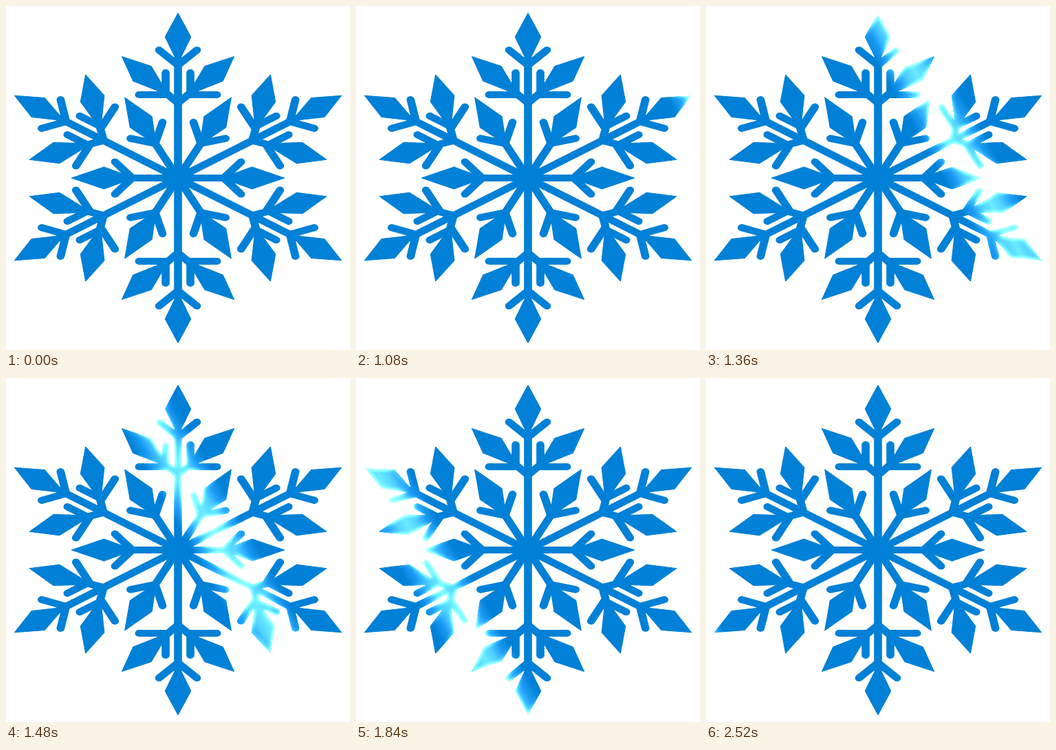
An HTML page that plays this animation: 500 by 500 pixels, repeating every 4120 ms.

```html
<!DOCTYPE html>
<html lang="en">
<head>
<meta charset="utf-8">
<title>Snowflake</title>
<style>
  html, body { margin: 0; width: 100%; height: 100%; overflow: hidden; background: #fff; }
  svg { display: block; width: 100%; height: 100%; isolation: isolate; }
  .line, .gem { stroke: #0080d6; stroke-linejoin: round; }
  .line { fill: none; stroke-width: 10.2; stroke-linecap: round; }
  .gem { fill: #0080d6; stroke-width: 1; }
  #light { mix-blend-mode: plus-lighter; }
</style>
</head>
<body>
<svg viewBox="0 0 500 500">
  <defs>
    <linearGradient id="band" gradientUnits="userSpaceOnUse" x1="-36.4" y1="21" x2="36.4" y2="-21">
      <stop offset="0" stop-color="#fff" stop-opacity="0"/>
      <stop offset=".167" stop-color="#fff" stop-opacity=".25"/>
      <stop offset=".333" stop-color="#fff" stop-opacity=".75"/>
      <stop offset=".5" stop-color="#fff"/>
      <stop offset=".667" stop-color="#fff" stop-opacity=".75"/>
      <stop offset=".833" stop-color="#fff" stop-opacity=".25"/>
      <stop offset="1" stop-color="#fff" stop-opacity="0"/>
    </linearGradient>
    <mask id="sweep" maskUnits="userSpaceOnUse" x="0" y="0" width="500" height="500">
      <rect width="500" height="500" fill="url(#band)"/>
    </mask>
    <!-- white, strongest along the edges of the shape -->
    <filter id="edge" filterUnits="userSpaceOnUse" x="0" y="0" width="500" height="500">
      <feGaussianBlur stdDeviation="3"/>
      <feColorMatrix values="0 0 0 0 1  0 0 0 0 1  0 0 0 0 1  0 0 0 -2 2"/>
    </filter>
    <g id="side">
      <path class="gem" d="M-71.2-176.6L-34-162.5L-17-130L-22-125L-57-141Z"/>
      <path class="line" d="M0-109L-20-128M-15.7-153V-121H-49.5"/>
    </g>
    <g id="long">
      <path class="line" d="M0 0V-174"/>
      <path class="line" d="M-24-186L0-164L24-186"/>
      <path class="gem" d="M0-239.5L16.3-205L4-176H-4L-16.3-205Z"/>
      <use href="#side"/>
      <use href="#side" transform="scale(-1 1)"/>
    </g>
    <g id="short">
      <path class="line" d="M0 0V-64"/>
      <path class="line" d="M-23.5-80L0-58L23.5-80"/>
      <path class="gem" d="M0-135L16-94L4-65H-4L-16-94Z"/>
    </g>
    <g id="flake" transform="translate(250 250) scale(1.145 1)"></g>
  </defs>
  <rect width="500" height="500" fill="#fff"/>
  <use href="#flake"/>
  <g id="light" mask="url(#sweep)">
    <rect width="500" height="500" fill="#fff" opacity=".42"/>
    <g filter="url(#edge)"><use href="#flake"/></g>
  </g>
</svg>
<script>
  const LOOP = 4120, STEP = 40, START = 1080;
  const FROM = 366, SPEED = 0.537, END = -203;
  const NX = Math.cos(Math.PI / 6), NY = -Math.sin(Math.PI / 6);
  const $ = id => document.getElementById(id);
  const flake = $('flake'), band = $('band'), light = $('light');

  function addArm(id, angle) {
    const arm = document.createElementNS('http://www.w3.org/2000/svg', 'use');
    arm.setAttribute('href', '#' + id);
    arm.setAttribute('transform', `rotate(${angle})`);
    flake.append(arm);
  }
  for (let a = 0; a < 360; a += 60) {
    addArm('long', a);
    addArm('short', a + 30);
  }

  // The band travels along its normal and rests at the lower left tip.
  function draw(ms) {
    const t = Math.floor(ms % LOOP / STEP) * STEP;
    const s = Math.max(END, FROM - SPEED * (t - START));
    light.setAttribute('visibility', t < START ? 'hidden' : 'visible');
    band.setAttribute('gradientTransform', `translate(${NX * s} ${NY * s})`);
  }

  const begin = performance.now();
  function tick() {
    draw(performance.now() - begin);
    requestAnimationFrame(tick);
  }
  tick();
</script>
</body>
</html>
```
